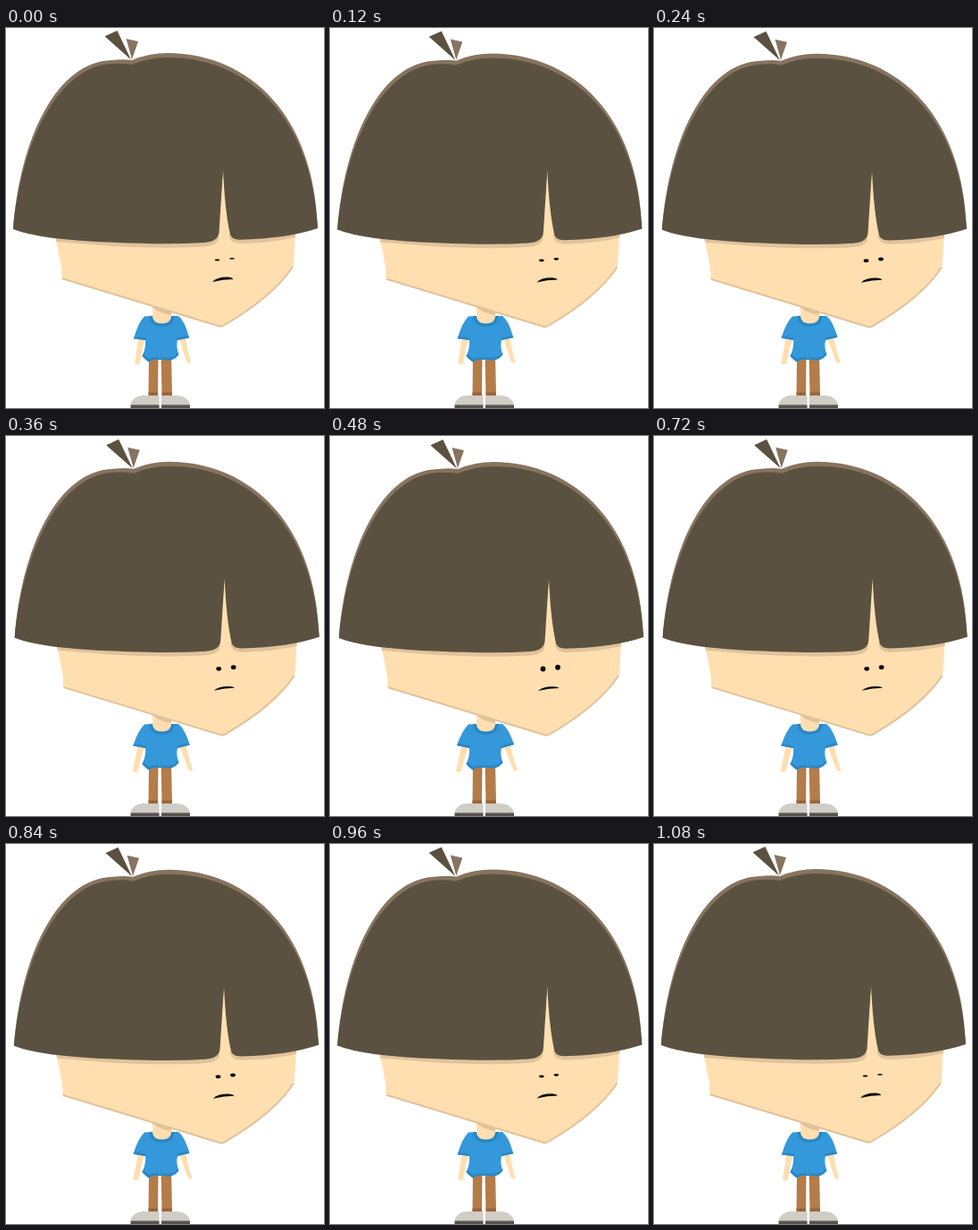
An HTML page with a canvas that plays this animation: 356x425 px, repeating every 1200 ms.

```html
<!DOCTYPE html>
<html lang="en">
<head>
<meta charset="utf-8">
<title>Breathing boy</title>
<style>
html, body { margin: 0; width: 100%; height: 100%; overflow: hidden; background: #fff; }
canvas { display: block; }
</style>
</head>
<body>
<canvas id="stage" width="356" height="425"></canvas>
<script>
const ctx = document.getElementById('stage').getContext('2d');
const STEP = 120, LOOP = 1200;
const SKIN = '#ffdfb0', SHADE = '#e0c29b', HAIR = '#5b5140', RIM = '#877460';
const SHIRT = '#3498db', HEM = '#2b86c4', PANTS = '#b37c48', CUFF = '#9a6538';
const INK = '#0b0908';

function fill(color, d) {
  ctx.fillStyle = color;
  ctx.fill(new Path2D(d));
}

function line(color, width, d) {
  ctx.strokeStyle = color;
  ctx.lineWidth = width;
  ctx.stroke(new Path2D(d));
}

function oval(x, y, rx, ry) {
  ctx.beginPath();
  ctx.ellipse(x, y, rx, ry, 0, 0, Math.PI * 2);
  ctx.fill();
}

function arm(x, y, angle, d) {
  ctx.save();
  ctx.translate(x, y);
  ctx.rotate(angle);
  ctx.translate(-x, -y);
  fill(SKIN, d);
  ctx.restore();
}

function legs() {
  fill(PANTS, 'M160 366H170.5L170 411H159.5Z M173.5 366H185L186 411H174.5Z');
  fill(CUFF, 'M159.5 407.5H170V411H159.5Z M174.5 407.5H186V411H174.5Z');
  fill('#d0ccc6', 'M139.5 422Q141 412 153 411H171.5V422Z M174 422V411H192Q204 412 206 422Z');
  fill('#57524d', 'M139.5 421.5H171.5V425H139.5Z M174 421.5H206V425H174Z');
}

function torso(p) {
  arm(151, 340, p * 0.09, 'M148 345L155.5 346Q152 361 150 375Q147 378 144 375Q146 362 148 345Z');
  arm(198, 340, -p * 0.09, 'M194 347L201 345Q203 361 207 374Q204 377 201.5 372Q198 360 194 347Z');

  const lx = 143 - p, rx = 205 + p, y = 347.5 - p * 1.5;
  const shirt = `M155 322.5L164 322H185L193 322Q200 327 ${rx} ${y - 1}L192 349
    Q190 357 193.5 365Q190 370 184 371.5L177 371L164 371L160 373.5Q156 371 152.5 367
    Q157 357 156 349L${lx} ${y}Q148 329 155 322.5Z`;
  fill(SHIRT, shirt);

  // Hems stay inside the shirt outline
  ctx.save();
  ctx.clip(new Path2D(shirt));
  line(HEM, 5, `M${lx} ${y}L156 349 M${rx} ${y - 1}L192 349
    M152 366Q156 371 160 373L164 371H184Q190 370 194 365`);
  line(HEM, 7, 'M164 321Q164 330.5 174.5 330.5Q185 330.5 185 321');
  ctx.restore();

  fill(SKIN, 'M164 305H185V323Q184 330.5 174.5 330.5Q165 330.5 164 323Z');
  fill(SHADE, 'M164 306L185 312V321Q173 320 164 312Z');
}

function head(p) {
  ctx.save();
  const ease = p * p * (3 - 2 * p);
  ctx.translate(ease * 2, Math.sqrt(p));

  fill(SKIN, `M54 225L62 268Q63 275 62 280L238 333.5Q241 335 244 333
    Q299 301 321.5 267Q323 250 324 225L254 150H236Z`);
  line(SHADE, 2, 'M63 280.3L238 333.3Q241 334.5 244 332.5Q299 300.5 321 267');
  fill(SHADE, `M54.5 230H238V237Q235 243 222 244.5Q180 247 120 244L56 239Z
    M250 230H324V234Q300 240 264 241Q252 241.5 250 234Z`);

  fill(RIM, `M8 225C16 122 57 38 118 36Q132 34.5 141 36
    Q160 28 181 28C275 29 345 100 349 224Z`);
  fill(SKIN, 'M243 158L237 229H253Z');
  fill(HAIR, `M8 225C17 127 59 43 118 40Q132 39 141 41
    Q160 33 181 33C273 33 343 103 349 224
    Q315 235.5 262 236.7Q253 237 251 231Q245 205 243 158Q240 205 238.5 229
    Q237 239 222 240Q180 242.5 120 239.7Q38 237 8 225Z`);
  fill(HAIR, 'M110.5 9.3L124.5 3L140 35.5Z');
  fill(RIM, 'M134.5 12L148 15L141 35Z');

  ctx.fillStyle = INK;
  const ry = 0.9 + p * 2.1;
  oval(236.5, 259.5, 2.9, ry);
  oval(253, 257.8, 2.9, ry);
  const my = 278.3 + p * 0.8;
  fill(INK, `M231 284Q236 ${my} 248 ${my + 0.2}Q253 ${my + 0.4} 254.5 281
    Q243 281 231 284Z`);
  ctx.restore();
}

// Four stepped poses out, a hold, then four back
function pose(t) {
  const i = Math.floor(t / STEP);
  return (i <= 4 ? i : Math.min(4, 9 - i)) / 4;
}

function draw(now) {
  const p = pose(now % LOOP);
  ctx.fillStyle = '#fff';
  ctx.fillRect(0, 0, 356, 425);
  legs();
  torso(p);
  head(p);
}

let start;
function loop(now) {
  start ??= now;
  draw(Math.max(0, now - start));
  requestAnimationFrame(loop);
}
requestAnimationFrame(loop);
</script>
</body>
</html>
```
